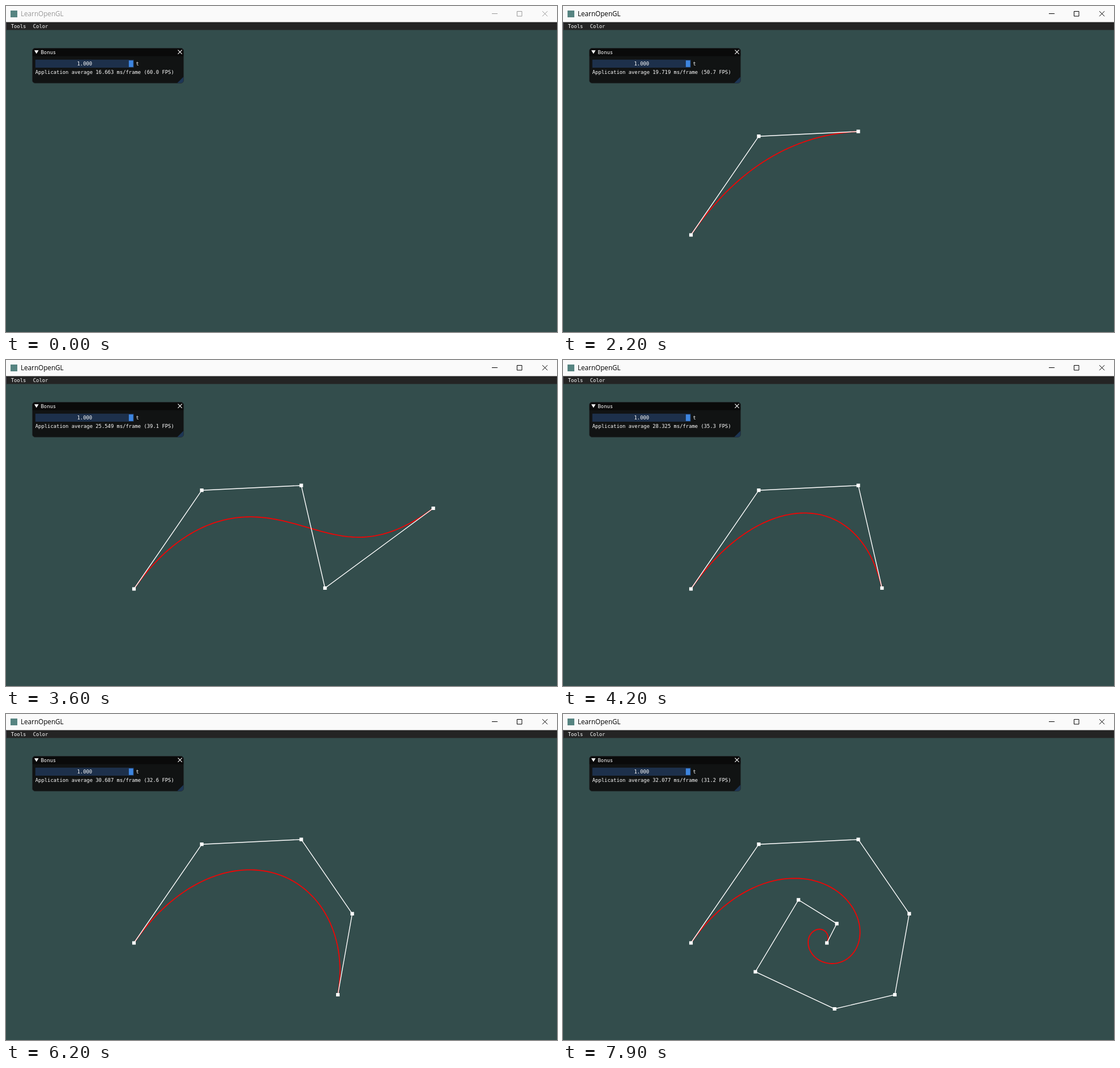
Recreate the animation shown at these times as an HTML page. Size 973x576 px, loop 8000 ms.

```html
<!DOCTYPE html>
<html lang="en">
<head>
<meta charset="utf-8">
<title>Bezier curve editor</title>
<style>
  html, body { margin: 0; width: 100%; height: 100%; overflow: hidden; background: #334d4c; }
  svg { display: block; }
  .ui { font: 8.86px "DejaVu Sans Mono", monospace; fill: #fff; }
  .title { font: 11.7px "Open Sans", "Noto Sans", sans-serif; }
  #chrome { color: #999; }
  #chrome.active { color: #000; }
  #chrome text { fill: currentColor; }
  #chrome path { fill: none; stroke: currentColor; }
  #curve { fill: none; stroke: #f00505; stroke-width: 1.8; }
  #hull { fill: none; stroke: #fff; stroke-width: 1.4; }
  #dots { fill: #fff; }
</style>
</head>
<body>
<svg width="973" height="576" viewBox="0 0 973 576">
  <rect width="973" height="576" fill="#334d4c"/>

  <path id="curve"/>
  <path id="hull"/>
  <path id="dots"/>

  <rect width="973" height="29" fill="#fafafa"/>
  <rect x="8" y="8" width="12" height="12" fill="#568481"/>
  <g id="chrome">
    <text class="title" x="26" y="18.3">LearnOpenGL</text>
    <path d="M858 13.5h10M902.5 9.5h8.5v8.5h-8.5zM947.2 9.2l9 9m0-9l-9 9"/>
  </g>

  <rect y="28.5" width="973" height="13.9" fill="#242424"/>
  <rect y="28.5" width="1" height="13.9" fill="#454550"/>
  <g class="ui">
    <text x="8.7" y="38.8">Tools</text>
    <text x="47.8" y="38.8">Color</text>
  </g>

  <rect x="46.4" y="74.6" width="267.4" height="61.8" rx="5" fill="#111313"/>
  <path d="M46.4 88.7v-9.1a5 5 0 0 1 5-5h257.4a5 5 0 0 1 5 5v9.1z" fill="#0a0a0a"/>
  <path d="M313.6 125v6.4a5 5 0 0 1-5 5h-6.6z" fill="#1d3655"/>
  <rect x="46.4" y="74.6" width="267.4" height="61.8" rx="5" fill="none" stroke="#2b3638" stroke-width=".7"/>
  <path d="M50 78.3h7.6l-3.8 6.2z" fill="#fff"/>
  <path d="M303.6 77.6l7.2 7.2m0-7.2l-7.2 7.2" stroke="#fff" stroke-width="1.1"/>
  <rect x="51.8" y="94.8" width="174" height="14.2" fill="#1d304b"/>
  <rect x="216.9" y="96.2" width="7.8" height="11.6" fill="#3d85e0"/>
  <g class="ui">
    <text x="61.5" y="84.7">Bonus</text>
    <text x="125.5" y="105.1">1.000</text>
    <text x="229.4" y="105.1">t</text>
    <text id="stats" x="51.8" y="120.2"></text>
  </g>
</svg>
<script>
  const LOOP = 8000, STEP = 100;
  const $ = id => document.getElementById(id);

  // Control points that stay, in click order, and two that are undone
  const kept = [
    [226, 404.5], [345.7, 230.2], [521.4, 221.7], [611.4, 352.8], [586, 496],
    [479.6, 521], [339.7, 455.5], [415.8, 328.4], [483.5, 370.3], [466, 404.5]
  ];
  const undone = [[563.3, 403], [754.5, 262]];

  // Measured load: step, milliseconds per frame
  const load = [
    [12, 16.664], [22, 19.719], [30, 22.773], [42, 28.325],
    [62, 30.687], [72, 31.241], [79, 32.077]
  ];

  function controlPoints(k) {
    if (k < 18) return kept.slice(0, (k >= 3) + (k >= 13));
    if (k < 45) {
      const tries = k < 41 ? Math.floor((k - 18) / 8) : 1;
      return [...kept.slice(0, 3), ...undone.slice(0, tries)];
    }
    if (k < 60) return kept.slice(0, k < 52 ? 3 : 4);
    return kept.slice(0, 5 + Math.floor((k - 60) / 3.5));
  }

  function frameTime(k) {
    if (k < 13) return 16.663 + Math.min(k, 10) * 3 % 4 / 1000;
    const i = load.findIndex(p => p[0] >= k);
    const [k0, v0] = load[i - 1], [k1, v1] = load[i];
    return v0 + (v1 - v0) * (k - k0) / (k1 - k0);
  }

  function bezier(pts, u) {
    let row = pts;
    while (row.length > 1) {
      row = row.slice(1).map((p, i) => [
        row[i][0] + (p[0] - row[i][0]) * u,
        row[i][1] + (p[1] - row[i][1]) * u
      ]);
    }
    return row[0];
  }

  const path = pts => pts.length > 1
    ? "M" + pts.map(p => p[0].toFixed(2) + " " + p[1].toFixed(2)).join("L") : "";

  function draw(k) {
    const pts = controlPoints(k);
    const samples = pts.length > 1
      ? Array.from({ length: 121 }, (_, i) => bezier(pts, i / 120)) : [];
    $("curve").setAttribute("d", path(samples));
    $("hull").setAttribute("d", path(pts));
    $("dots").setAttribute("d",
      pts.map(([x, y]) => `M${x - 3.1} ${y - 3.1}h6.2v6.2h-6.2z`).join(""));
    $("chrome").classList.toggle("active", k >= 2);
    const ms = frameTime(k);
    $("stats").textContent =
      `Application average ${ms.toFixed(3)} ms/frame (${(1000 / ms).toFixed(1)} FPS)`;
  }

  const start = performance.now();
  let last = -1;
  function tick() {
    const k = Math.floor((performance.now() - start) % LOOP / STEP);
    if (k !== last) draw(last = k);
    requestAnimationFrame(tick);
  }
  tick();
</script>
</body>
</html>
```
